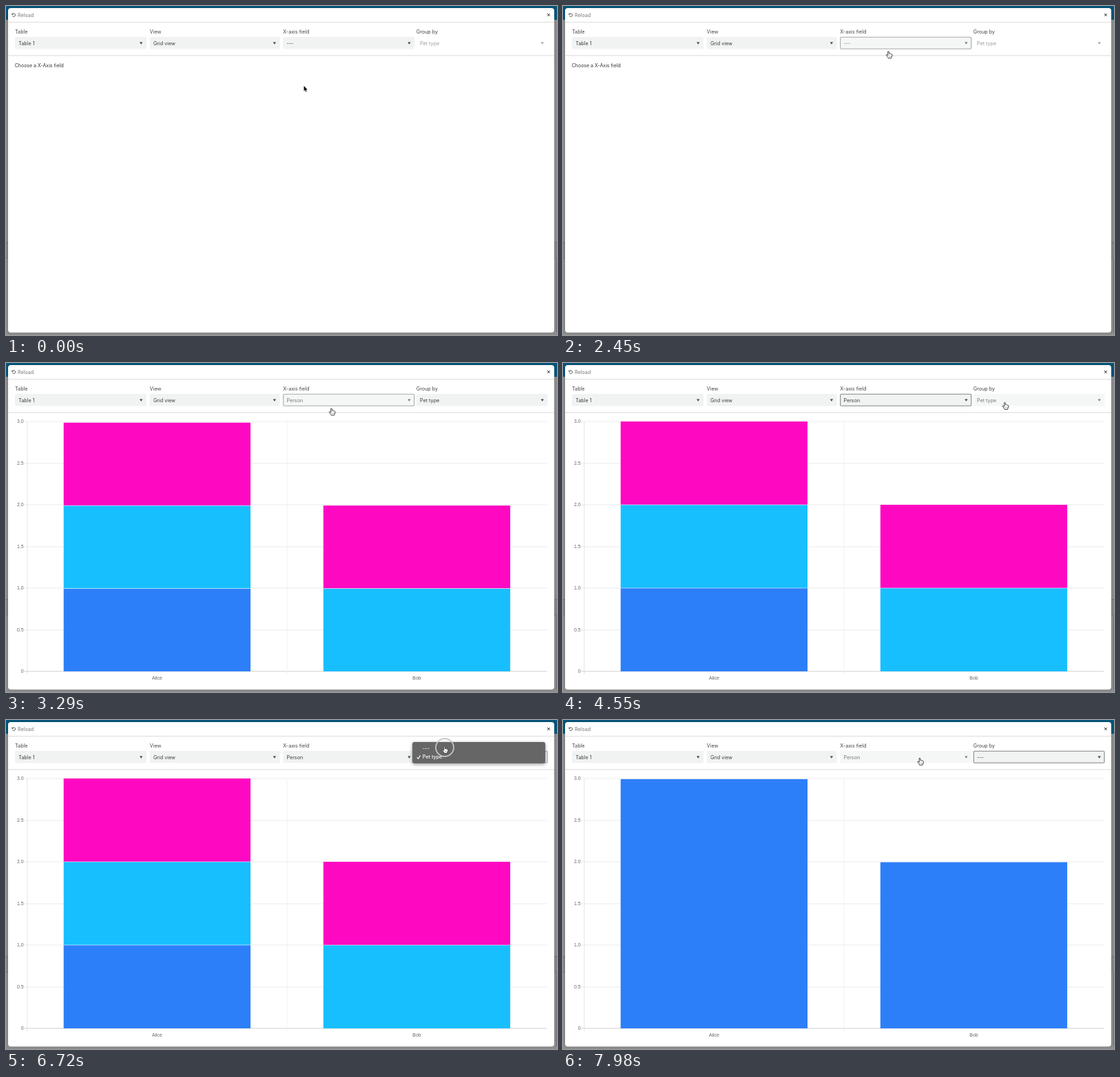
An HTML page with a canvas that plays this animation: 800x478 px, repeating every 8000 ms.

```html
<!DOCTYPE html>
<html lang="en">
<head>
<meta charset="utf-8">
<title>Chart settings</title>
<style>
  html, body { margin: 0; width: 100%; height: 100%; overflow: hidden; background: #8c8c8c; }
  canvas { display: block; width: 800px; height: 478px; }
</style>
</head>
<body>
<canvas id="stage"></canvas>
<script>
const W = 800, H = 478, LOOP = 8000, STEP = 70;
const canvas = document.getElementById('stage');
const ctx = canvas.getContext('2d');
const scale = window.devicePixelRatio || 1;
canvas.width = W * scale;
canvas.height = H * scale;

const UI = 'Inter, "Open Sans", sans-serif';
const CHART = '"Liberation Sans", Arial, sans-serif';
const BLUE = '#2d7ff9', CYAN = '#18bfff', PINK = '#ff08c2';

const X_DRAW = 2550, GROUP_DRAW = 7205, GROW = 1000;

// Pointer tip: time, x, y, linear
const path = [
  [0, 432.5, 116], [70, 432.5, 116], [210, 434, 113], [350, 434, 113],
  [1120, 461, 56], [1470, 461, 56], [1820, 472.5, 66], [3600, 472.5, 66],
  [4550, 641.5, 57.5], [5740, 641.5, 57.5], [6580, 636.5, 38.5],
  [6980, 636.5, 38.5], [7420, 587.5, 50, 1], [7980, 518, 55.5, 1], [8000, 517, 55.5]
];

const popups = [
  { x: 397, y: 45, items: ['---', 'Person', 'Pet type'], checked: 0, press: 1190, open: 1300, pick: 1960 },
  { x: 590, y: 32, items: ['---', 'Pet type'], checked: 1, press: 4900, open: 5010, pick: 6650 }
];

const clamp = (v, a = 0, b = 1) => Math.min(b, Math.max(a, v));
const within = (t, a, b) => t >= a && t < b;
const outQuart = p => 1 - (1 - clamp(p)) ** 4;

function pointerAt(t) {
  let i = 1;
  while (i < path.length - 1 && t > path[i][0]) i++;
  const a = path[i - 1], b = path[i];
  let p = clamp((t - a[0]) / (b[0] - a[0]));
  if (!b[3]) p = p * p * (3 - 2 * p);
  return [a[1] + (b[1] - a[1]) * p, a[2] + (b[2] - a[2]) * p];
}

function rect(x, y, w, h, fill) {
  ctx.fillStyle = fill;
  ctx.fillRect(x, y, w, h);
}

function round(x, y, w, h, r) {
  ctx.beginPath();
  ctx.roundRect(x, y, w, h, r);
}

function text(str, x, y, color, size = 7.2, align = 'left', family = UI, weight = 400) {
  ctx.font = `${weight} ${size}px ${family}`;
  ctx.textAlign = align;
  ctx.textBaseline = 'alphabetic';
  ctx.fillStyle = color;
  ctx.fillText(str, x, y + size * 0.36);
}

function poly(points, close = true) {
  ctx.beginPath();
  points.forEach(([x, y]) => ctx.lineTo(x, y));
  if (close) ctx.closePath();
}

function stroke(color, width) {
  ctx.strokeStyle = color;
  ctx.lineWidth = width;
  ctx.stroke();
}

function drawWindow() {
  rect(0, 0, W, H, '#8c8c8c');
  rect(0, 0, W, 20, '#05557a');
  rect(0, 343, W, 24, '#848484');
  rect(0, 343, W, 1, '#707070');
  rect(0, 366, W, 1, '#787878');
  rect(799, 367, 1, 107, '#6c6c6c');

  ctx.save();
  ctx.shadowColor = 'rgba(0,0,0,.3)';
  ctx.shadowBlur = 2 * scale;
  round(3, 3, 793, 471.5, 4);
  ctx.fillStyle = '#fff';
  ctx.fill();
  ctx.restore();
  rect(3, 23, 793, 1, '#dedede');
  rect(3, 71.5, 793, 1, '#dadada');

  ctx.beginPath();
  ctx.arc(11.3, 13.1, 2.3, -2.5, 2.5);
  stroke('#444', 0.9);
  poly([[8.4, 10.2], [8.4, 12.8], [11, 12.8]]);
  ctx.fillStyle = '#444';
  ctx.fill();
  text('Reload', 17, 13, '#777');

  poly([[786, 11], [789.6, 14.6]], false);
  stroke('#222', 1);
  poly([[789.6, 11], [786, 14.6]], false);
  stroke('#222', 1);
}

function drawSelect(label, value, x, w, { dim = 1, off = false, focus = false } = {}) {
  text(label, x, 37, '#444');
  ctx.save();
  ctx.globalAlpha = off ? 0.5 : dim;
  round(x, 45, w, 17.5, 1.5);
  if (!off) {
    ctx.fillStyle = '#f1f3f3';
    ctx.fill();
  }
  if (focus) {
    round(x + 0.5, 45.3, w - 1, 17, 1.5);
    stroke('#858585', 1.1);
  }
  text(value, x + 5.2, 54, '#3c3c3c');
  const ax = x + w - 7.8;
  poly([[ax - 2.2, 52.5], [ax + 2.2, 52.5], [ax, 55.7]]);
  ctx.fillStyle = '#444';
  ctx.fill();
  ctx.restore();
}

function drawControls(t) {
  const xDim = within(t, 1080, 3950) || t >= 7460 ? 0.68 : 1;
  const groupDim = within(t, 4340, 7000) ? 0.68 : 1;
  drawSelect('Table', 'Table 1', 13, 191);
  drawSelect('View', 'Grid view', 208.7, 189);
  drawSelect('X-axis field', t < X_DRAW ? '---' : 'Person', 402.2, 191,
    { dim: xDim, focus: within(t, 1190, 4900) });
  drawSelect('Group by', t < GROUP_DRAW ? 'Pet type' : '---', 595.8, 190.7,
    { dim: groupDim, off: t < X_DRAW, focus: t >= 4900 });
}

function drawBar(x, colors, unit) {
  colors.forEach(([color, size], i) => {
    const h = size * unit;
    const y = 448 - (i + 1) * h;
    rect(x, y, 271.3, h, color);
    if (i) rect(x, y + h - 0.5, 271.3, 1, 'rgba(255,255,255,.55)');
  });
}

function drawChart(t) {
  if (t < X_DRAW) {
    text('Choose a X-Axis field', 12.7, 86, '#333', 7);
    return;
  }
  for (let i = 0; i <= 6; i++) {
    const y = 448 - i * 60.5;
    rect(26, Math.round(y) - 0.5, 759.5, 1, i ? '#ececec' : '#cfcfcf');
    text(i ? (i / 2).toFixed(1) : '0', 25.5, y, '#666', 6.9, 'right', CHART);
  }
  [30.5, 407.7].forEach((x, i) => rect(x, 85, 0.8, 367, i ? '#efefef' : '#dedede'));

  const grouped = t < GROUP_DRAW;
  const unit = 121 * outQuart((t - (grouped ? X_DRAW : GROUP_DRAW)) / GROW);
  drawBar(83.7, grouped ? [[BLUE, 1], [CYAN, 1], [PINK, 1]] : [[BLUE, 3]], unit);
  drawBar(460.8, grouped ? [[CYAN, 1], [PINK, 1]] : [[BLUE, 2]], unit);
  text('Alice', 219.4, 458, '#666', 6.9, 'center', CHART);
  text('Bob', 596.5, 458, '#666', 6.9, 'center', CHART);
}

function drawPopup(p, t, tipY) {
  const closing = p.pick + 180;
  if (!within(t, p.open, closing + 140)) return;
  const h = p.items.length * 12.2 + 6.6;
  ctx.save();
  ctx.globalAlpha = 1 - clamp((t - closing) / 140);
  ctx.shadowColor = 'rgba(0,0,0,.4)';
  ctx.shadowBlur = 5 * scale;
  ctx.shadowOffsetY = 1.5 * scale;
  round(p.x, p.y, 193, h, 3.2);
  ctx.fillStyle = '#666667';
  ctx.fill();
  ctx.shadowColor = 'transparent';

  const hover = clamp(Math.floor((tipY - p.y - 3) / 12.2), 0, p.items.length - 1);
  const blink = within(t, p.pick + 35, p.pick + 105);
  if (!blink) {
    round(p.x + 2.5, p.y + 3.2 + hover * 12.2, 188, 12.2, 2);
    ctx.fillStyle = '#3578e5';
    ctx.fill();
  }
  p.items.forEach((item, i) => {
    const y = p.y + 9.6 + i * 12.3;
    text(item, p.x + 14.8, y, '#fff', 7.2, 'left', UI, 500);
    if (i === p.checked) {
      poly([[p.x + 6.8, y + 0.3], [p.x + 8.5, y + 2.4], [p.x + 11.6, y - 2.5]], false);
      stroke('#fff', 1.1);
    }
  });
  ctx.restore();
}

function drawRing(t, x, y) {
  for (const start of popups.flatMap(p => [p.press, p.pick])) {
    if (!within(t, start, start + 220)) continue;
    ctx.save();
    ctx.globalAlpha = 1 - clamp((t - start - 100) / 120);
    ctx.beginPath();
    ctx.arc(x + 0.5, y + 1.5, 13, 0, Math.PI * 2);
    stroke('rgba(200,200,200,.95)', 1.8);
    ctx.restore();
  }
}

function drawPointer(t, x, y) {
  ctx.save();
  ctx.translate(x, y);
  ctx.lineJoin = 'round';
  if (t < 1040) {
    poly([[0, 0], [0, 7.6], [1.7, 6.1], [2.8, 8.8], [4.1, 8.2], [3, 5.7], [5.2, 5.6]]);
    stroke('#fff', 1.2);
    ctx.fillStyle = '#111';
    ctx.fill();
  } else {
    poly([[-0.9, 0.2], [0, -0.3], [0.8, 0.3], [1, 3.2], [2.3, 3], [2.8, 3.6], [4, 3.5],
      [4.5, 4.2], [5.4, 4.6], [5.3, 7], [4.3, 8.5], [4.2, 9.9], [-0.3, 9.9],
      [-0.8, 8.4], [-3.2, 5.6], [-2.9, 4.7], [-1.9, 4.9], [-0.7, 6]]);
    ctx.fillStyle = '#fff';
    ctx.fill();
    stroke('#333', 0.9);
    for (const fx of [1.2, 2.5, 3.8]) {
      poly([[fx, 6.2], [fx, 8.2]], false);
      stroke('#666', 0.45);
    }
  }
  ctx.restore();
}

function draw(now) {
  const t = Math.floor((now % LOOP) / STEP) * STEP;
  const [x, y] = pointerAt(t);
  ctx.setTransform(scale, 0, 0, scale, 0, 0);
  drawWindow();
  drawControls(t);
  drawChart(t);
  popups.forEach(p => drawPopup(p, t, y));
  drawRing(t, x, y);
  drawPointer(t, x, y);
}

const start = performance.now();
function tick() {
  draw(performance.now() - start);
  requestAnimationFrame(tick);
}
tick();
</script>
</body>
</html>
```
